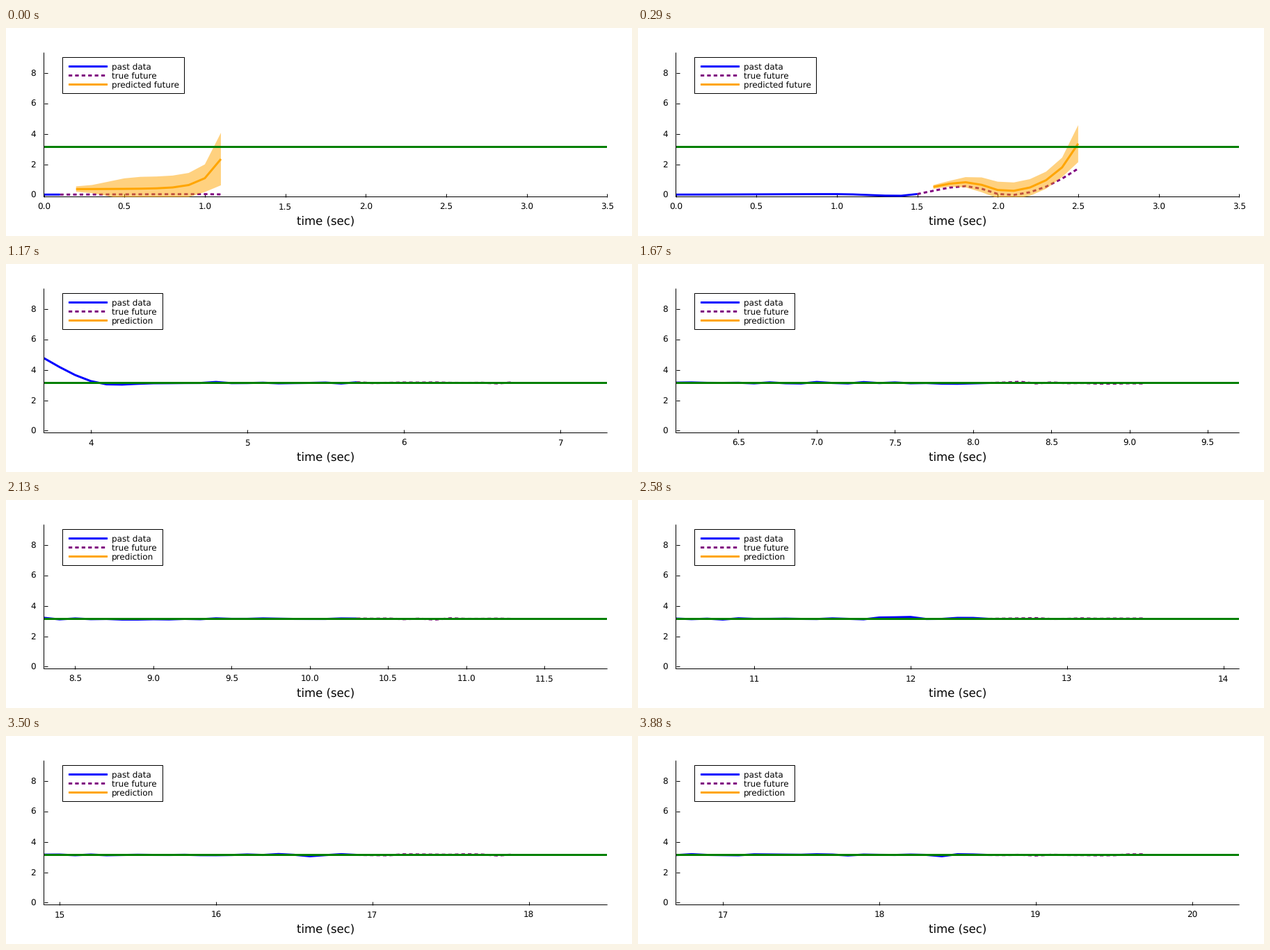
Write a matplotlib script that moves like this. It is 900 px wide and 300 px high and loops after 3930 ms.

```python
import numpy as np
import matplotlib.pyplot as plt
from matplotlib.animation import FuncAnimation
from matplotlib.patches import Polygon, Rectangle

plt.rcParams.update({
    "font.family": "DejaVu Sans",
    "text.hinting": "none",
    "lines.scale_dashes": False,
    "lines.solid_capstyle": "butt",
    "lines.dash_capstyle": "butt",
})

# One point equals one pixel at 72 dpi.
W, H = 900, 300
LEFT, RIGHT, TOP, BOTTOM = 54.5, 864.2, 36, 243.5
ZERO, UNIT = 240.3, 21.9
TICK, LOOP, STEPS = 10, 3930, 94
HORIZON, RIBBON_STEPS = 10, 10
DASH = (0, (5.2, 4.2))

# Turning points of the pendulum: (time, angle).
TURNS = [(0, 0), (1.0, 0.03), (1.38, -0.08), (1.81, 0.56), (2.06, -0.04),
         (3.3, 6.23), (4.15, 3.02), (4.4, np.pi), (11.7, np.pi),
         (11.9, 3.3), (12.1, np.pi), (13.4, np.pi), (13.6, 3.27),
         (13.8, np.pi), (20, np.pi)]


def ease(u):
    return (1 - np.cos(np.pi * np.clip(u, 0, 1))) / 2


def swing(t):
    """Cosine-eased path through the turning points."""
    (t0, a0), (t1, a1) = next(p for p in zip(TURNS, TURNS[1:])
                              if t <= p[1][0])
    return a0 + (a1 - a0) * ease((t - t0) / (t1 - t0))


rng = np.random.default_rng(4)
time = np.arange(200) / 10
angle = np.array([swing(t) for t in time])
angle += np.where(time > 4.2, rng.normal(0, 0.03, len(time)), 0)

n = np.arange(HORIZON)
first_mean = 0.36 + 1.97 * np.exp(1.05 * (n - 9))
first_dev = 0.18 + 0.6 * ease(n / 4) + 0.95 * np.exp(2.0 * (n - 9))
spread = np.r_[1, rng.uniform(0.5, 1.2, RIBBON_STEPS)]

fig = plt.figure(figsize=(W / 72, H / 72), dpi=72, facecolor="white")
ax = fig.add_axes([LEFT / W, 1 - BOTTOM / H,
                   (RIGHT - LEFT) / W, (BOTTOM - TOP) / H])
ax.set_ylim((ZERO - BOTTOM) / UNIT, (ZERO - TOP) / UNIT)
ax.spines[["top", "right"]].set_visible(False)
ax.spines[["left", "bottom"]].set(linewidth=1, zorder=0.5, snap=False)
ax.tick_params(direction="in", length=5, width=1, labelsize=12)
ax.tick_params(axis="x", pad=18)
ax.set_yticks(range(0, 9, 2), [])
plt.setp(ax.get_yticklines(), snap=False)

# Pixel-sized layer for the text and the legend.
stage = fig.add_axes([0, 0, 1, 1], zorder=2)
stage.set(xlim=(0, W), ylim=(H, 0))
stage.axis("off")


def label(x, y, s, size=12, ha="left"):
    return stage.text(x, y, s, size=size, ha=ha, va="baseline", color="black")


def curve(axes, color, z=2, style="-", x=(), y=()):
    return axes.plot(x, y, color=color, lw=3, ls=style, zorder=z,
                     snap=False)[0]


future = curve(ax, "purple", 2, DASH)
past = curve(ax, "blue", 2.1)
band = ax.add_patch(Polygon([(0, 0)] * 3, color="orange", alpha=0.5,
                            lw=0, zorder=2.2))
guess = curve(ax, "orange", 2.3)
ax.axhline(np.pi, color="green", lw=3, zorder=2.4, snap=False)

for v in range(0, 9, 2):
    label(42.6, ZERO - v * UNIT + 4.4, str(v), ha="right")
label(460, 284.8, "time (sec)", 16.5, "center")

box = stage.add_patch(Rectangle((81.5, 42.5), 175, 52, fc="white", ec="black",
                                lw=1, snap=False))
names = []
for row, (name, color, style) in enumerate([("past data", "blue", "-"),
                                            ("true future", "purple", DASH),
                                            ("prediction", "orange", "-")]):
    y = 55.5 + 13 * row
    curve(stage, color, 2, style, [90, 146], [y, y])
    names.append(label(152.3, y + 4.1, name))


def set_window(lo, hi):
    """Whole-second ticks where four fit, otherwise half seconds."""
    ax.set_xlim(lo, hi)
    ticks = np.arange(np.ceil(lo), hi + 1e-6)
    fmt = "{:.0f}"
    if lo == 0 or len(ticks) < 4:
        ticks = np.arange(np.ceil(lo * 2), hi * 2 + 1e-6) / 2
        fmt = "{:.1f}"
    ax.set_xticks(ticks, [fmt.format(v) for v in ticks], va="baseline")


def predict(step, ahead):
    """Forecast drifting off the truth, less and less until it settles."""
    if step < RIBBON_STEPS:
        return angle[ahead] + first_mean * spread[step]
    fade = min(1, 1 - (step - 14) / 6)
    if fade <= 0:
        return np.full(HORIZON, np.pi)
    return angle[ahead] + fade * (0.048 * n ** 2.57 - 0.08)


def update(i):
    # The picture advances at 24 fps, rounded to 10 ms ticks.
    step = min((24 * (2 * i + 1) - 1) // 200, STEPS - 1)
    now = 1 + 2 * step
    start = max(0, now - 20)
    set_window(start / 10, max(35, now + 16) / 10)

    past.set_data(time[start:now + 1], angle[start:now + 1])
    future.set_data(time[now:now + 11], angle[now:now + 11])
    ahead = slice(now + 1, now + 1 + HORIZON)
    t, mean = time[ahead], predict(step, ahead)
    guess.set_data(t, mean)

    early = step < RIBBON_STEPS
    band.set_visible(early)
    if early:
        dev = first_dev * spread[step]
        band.set_xy(np.c_[np.r_[t, t[::-1]],
                          np.r_[mean + dev, (mean - dev)[::-1]]])
    names[2].set_text("predicted future" if early else "prediction")
    box.set_width(175 if early else 144)
    return past, future, guess, band


anim = FuncAnimation(fig, update, frames=LOOP // TICK, interval=TICK,
                     init_func=lambda: update(0), repeat=True, repeat_delay=0,
                     blit=False)
plt.show()
```
